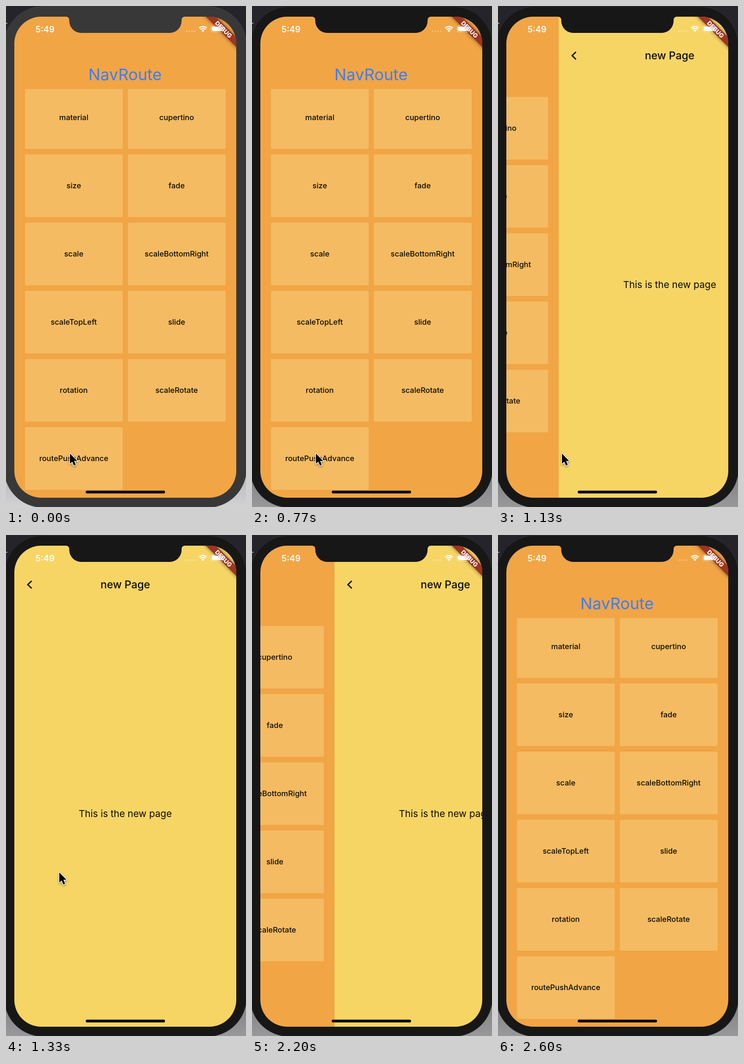
Recreate the animation shown at these times as an HTML page with a canvas. Size 518 px wide and 1080 px high, loop 2630 ms.

```html
<!DOCTYPE html>
<html lang="en">
<head>
<meta charset="utf-8">
<title>NavRoute</title>
<style>
html, body { margin: 0; width: 100%; height: 100%; overflow: hidden; background: #222228; }
canvas { display: block; width: 518px; height: 1080px; }
</style>
</head>
<body>
<canvas id="stage" width="518" height="1080"></canvas>
<script>
const canvas = document.getElementById('stage');
const ctx = canvas.getContext('2d');
const LOOP = 2630;
const FONT = 'Inter, "Open Sans", sans-serif';
const SCREEN = { x: 18, y: 23, w: 479, h: 1037, r: 58 };
const LABELS = ['material', 'cupertino', 'size', 'fade', 'scale', 'scaleBottomRight',
  'scaleTopLeft', 'slide', 'rotation', 'scaleRotate', 'routePushAdvance'];

// Moments of the story, in ms
const FOCUS = 700, PUSH = 902, POP = 2101, SLIDE = 300;
const MOVE = [1130, 1710], LEAVE = [2040, 2180];

const clamp = v => Math.max(0, Math.min(1, v));
const span = (t, a, b) => clamp((t - a) / (b - a));
const smooth = u => u * u * (3 - 2 * u);
const mix = (a, b, u) => a + (b - a) * u;

function box(x, y, w, h, r, fill) {
  ctx.beginPath();
  ctx.roundRect(x, y, w, h, r);
  ctx.fillStyle = fill;
  ctx.fill();
}

function text(str, x, y, size, weight, fill) {
  ctx.font = `${weight} ${size}px ${FONT}`;
  ctx.textAlign = 'center';
  ctx.fillStyle = fill;
  ctx.fillText(str, x, y);
}

function poly(points) {
  ctx.beginPath();
  points.forEach(([x, y]) => ctx.lineTo(x, y));
}

function body(active) {
  const back = ctx.createLinearGradient(0, 0, 0, 1080);
  back.addColorStop(0, '#24242a');
  back.addColorStop(0.3, '#222228');
  back.addColorStop(0.9, active ? '#77777a' : '#a9a9ac');
  back.addColorStop(1, active ? '#98989b' : '#d2d2d5');
  ctx.fillStyle = back;
  ctx.fillRect(0, 0, 518, 1080);
  box(0, 36.5, 3, 1.5, 0, '#c8c8c8');
  box(-4, 1, 523, 1080, 84, active ? '#171717' : '#383838');
  ctx.strokeStyle = active ? '#303032' : '#454547';
  ctx.lineWidth = 1;
  ctx.stroke();
}

function home(dx, scroll) {
  ctx.save();
  ctx.translate(dx, 0);
  ctx.fillStyle = '#f1a545';
  ctx.fillRect(18, 23, 479, 1037);
  text('NavRoute', 257, 159.5, 34.5, 400, '#3d7df5');
  ctx.beginPath();
  ctx.rect(18, 179, 479, 881);
  ctx.clip();
  LABELS.forEach((label, i) => {
    const x = 41 + (i % 2) * 222;
    const y = 196 - scroll + Math.floor(i / 2) * 147;
    box(x, y, 211, 135, 2.5, '#f4bb62');
    text(label, x + 105.3, y + 73.2, 16.4, 500, '#0c0a06');
  });
  ctx.restore();
}

function newPage(dx) {
  ctx.save();
  ctx.translate(dx, 0);
  ctx.fillStyle = '#f7d565';
  ctx.fillRect(18, 23, 479, 1037);
  ctx.strokeStyle = '#0c0a06';
  ctx.lineWidth = 2.7;
  poly([[55.3, 99], [47, 107], [55.3, 115]]);
  ctx.stroke();
  text('new Page', 257.5, 115, 22.9, 500, '#0c0a06');
  text('This is the new page', 257.5, 607.5, 20.6, 400, '#0c0a06');
  ctx.restore();
}

function banner() {
  ctx.save();
  ctx.translate(497, 23);
  ctx.rotate(Math.PI / 4);
  ctx.shadowColor = 'rgba(0,0,0,.5)';
  ctx.shadowBlur = 8;
  box(-60, 31.3, 120, 15, 0, '#9d3522');
  ctx.restore();
}

function bannerText() {
  ctx.save();
  ctx.translate(497, 23);
  ctx.rotate(Math.PI / 4);
  ctx.shadowColor = '#9d3522';
  ctx.shadowBlur = 2;
  text('DEBUG', 0, 43.6, 13, 800, '#fff');
  ctx.restore();
}

function statusBar() {
  text('5:49', 84.2, 56.5, 18.3, 600, '#fff');
  for (let i = 0; i < 4; i++) box(388.2 + i * 5.8, 52.6, 3.2, 3.2, 1.6, 'rgba(255,255,255,.33)');

  // Wi-Fi fan
  const from = -Math.PI * 0.75, to = -Math.PI * 0.25;
  ctx.strokeStyle = '#fff';
  ctx.lineWidth = 2.5;
  for (const r of [11.7, 7.6]) {
    ctx.beginPath();
    ctx.arc(425, 56, r, from, to);
    ctx.stroke();
  }
  ctx.beginPath();
  ctx.moveTo(425, 56);
  ctx.arc(425, 56, 4.4, from, to);
  ctx.fillStyle = '#fff';
  ctx.fill();

  // Battery
  ctx.beginPath();
  ctx.roundRect(442.3, 42.3, 28, 13.6, 4);
  ctx.strokeStyle = 'rgba(255,255,255,.4)';
  ctx.lineWidth = 1.2;
  ctx.stroke();
  box(444.3, 44.2, 24, 9.8, 2.3, '#fff');
}

function notch(fill) {
  ctx.beginPath();
  ctx.moveTo(129, 22);
  ctx.lineTo(129, 23);
  ctx.quadraticCurveTo(136.5, 23, 136.5, 31);
  ctx.arcTo(136.5, 58, 164, 58, 26);
  ctx.arcTo(379, 58, 379, 31, 26);
  ctx.lineTo(379, 31);
  ctx.quadraticCurveTo(379, 23, 386.5, 23);
  ctx.lineTo(386.5, 22);
  ctx.fillStyle = fill;
  ctx.fill();
}

function pointer(x, y) {
  ctx.save();
  ctx.translate(x, y);
  ctx.scale(0.9, 0.9);
  poly([[0, 2], [0, 26.5], [5.6, 21.3], [9.7, 30.8], [14, 29], [10, 19.7], [17.4, 19.7]]);
  ctx.closePath();
  ctx.lineJoin = 'round';
  ctx.lineWidth = 3;
  ctx.strokeStyle = '#fff';
  ctx.shadowColor = 'rgba(0,0,0,.4)';
  ctx.shadowBlur = 4;
  ctx.shadowOffsetY = 2;
  ctx.stroke();
  ctx.shadowColor = 'transparent';
  ctx.fillStyle = '#000';
  ctx.fill();
  ctx.restore();
}

function draw(t) {
  const active = t >= FOCUS;
  const shown = span(t, PUSH, PUSH + SLIDE) - span(t, POP, POP + SLIDE);
  body(active);

  ctx.save();
  ctx.beginPath();
  ctx.roundRect(SCREEN.x, SCREEN.y, SCREEN.w, SCREEN.h, SCREEN.r);
  ctx.clip();
  // The sliding copy of the list starts at its top; whole pixels keep edges crisp
  const shift = Math.round(shown * SCREEN.w);
  if (shown < 1) home(-shift, shown > 0 ? 0 : 23);
  if (shown > 0) newPage(SCREEN.w - shift);
  banner();
  statusBar();
  bannerText();
  box(172, 1044.8, 171.3, 5.9, 2.95, '#0a0704');
  ctx.restore();
  notch(active ? '#171717' : '#383838');

  const go = smooth(span(t, ...MOVE));
  const out = span(t, ...LEAVE) ** 2;
  if (out < 1) pointer(mix(138, 55, go) - out * 80, mix(963, 106, go) + out * 8);
}

const start = performance.now();
function tick() {
  draw((performance.now() - start) % LOOP);
  requestAnimationFrame(tick);
}
tick();
</script>
</body>
</html>
```
